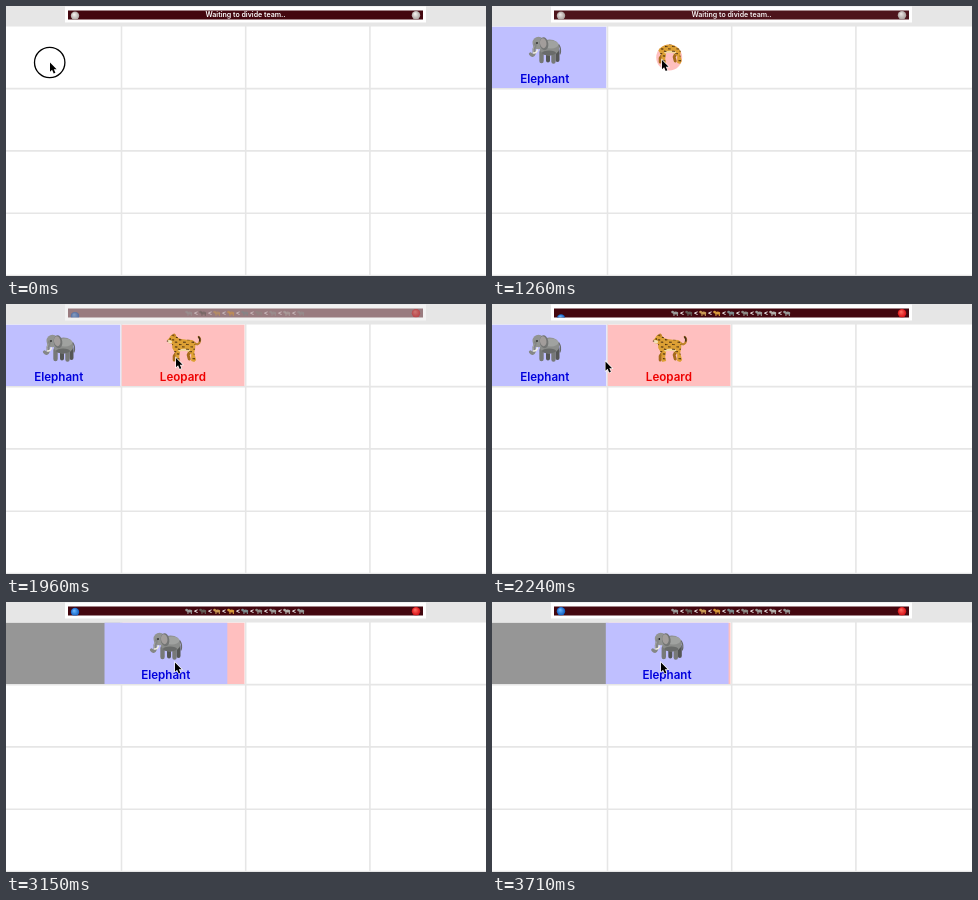
These frames come from a looping animation (480x270 px, 3780 ms). An HTML page with a canvas:

```html
<!DOCTYPE html>
<html lang="en">
<head>
<meta charset="utf-8">
<title>Board game</title>
<style>
html, body { margin: 0; width: 100%; height: 100%; overflow: hidden; background: #fff; }
canvas { display: block; width: 480px; height: 270px; }
</style>
</head>
<body>
<canvas id="stage" width="480" height="270"></canvas>
<script>
const ctx = document.getElementById('stage').getContext('2d');
const LOOP = 3780, STEP = 70;
const FONT = 'Inter, "Liberation Sans", sans-serif';
const CELL_W = 124.2, CELL_H = 62.3;
const GRID = '#e6e6e6';

const clamp = v => Math.max(0, Math.min(1, v));
const ramp = (t, a, b) => clamp((t - a) / (b - a));
const smooth = v => v * v * (3 - 2 * v);
const easeOut = v => 1 - (1 - v) ** 3;
const lerp = (a, b, v) => a + (b - a) * v;

function ellipse(x, y, rx, ry, color, tilt = 0) {
  ctx.fillStyle = color;
  ctx.beginPath();
  ctx.ellipse(x, y, rx, ry, tilt, 0, 7);
  ctx.fill();
}

function box(x, y, w, h, color, r = 0) {
  ctx.fillStyle = color;
  ctx.beginPath();
  ctx.roundRect(x, y, w, h, r);
  ctx.fill();
}

function line(path, color, width) {
  ctx.strokeStyle = color;
  ctx.lineWidth = width;
  ctx.lineCap = ctx.lineJoin = 'round';
  ctx.stroke(new Path2D(path));
}

function label(text, x, y, size, color, weight = 600) {
  ctx.font = `${weight} ${size}px ${FONT}`;
  ctx.textAlign = 'center';
  ctx.fillStyle = color;
  ctx.fillText(text, x, y);
}

function layer(draw, alpha = 1) {
  ctx.save();
  ctx.globalAlpha *= alpha;
  draw();
  ctx.restore();
}

// Animals are drawn around the card centre, facing left.
function elephant() {
  line('M3 3V11.5 M12.5 1V11', '#545655', 4);
  line('M-3.5 3V12 M8.5 2V12.5', '#777978', 4.4);
  ellipse(4.5, -1.5, 10, 8, '#8b8d8b');
  ellipse(6, -4.5, 7.5, 4, '#a0a2a0');
  ellipse(4, 4, 7, 2.4, '#696b6a');
  line('M14 -4Q16.5 0 15 5', '#686a69', 1.2);
  ellipse(-6.5, -6, 6, 6.3, '#929492');
  line('M-9.5 -5Q-11.5 0 -10.8 4.5Q-12 8 -14.5 5', '#858785', 3.2);
  line('M-11 -3Q-12.4 0 -11.7 4', '#a6a8a6', 1);
  line('M-7.5 1Q-9 4.5 -11.5 4', '#f0eee0', 1.5);
  ellipse(-1, -5.2, 4.3, 6.5, '#737574', -0.15);
  ellipse(-1.8, -5.8, 3.2, 5, '#a29d9b', -0.15);
  ellipse(-8, -6, 0.8, 0.9, '#222');
}

const CAT_BODY = new Path2D('M-14-9Q-12-14-8-12Q-6-9-2-8Q4-7 9-7Q13-5 12 1L11 6L13 13L11 15L8 14L8 7L4 4L-3 4L-4 10L-3 14L-7 15L-8 6L-11 1L-11-3L-15-4L-16-7Z');
function leopard() {
  line('M-5 3L-9 9L-9 13 M8 2L5 8L6 12', '#a66a1c', 3);
  line('M10 -5Q14 -1 16 -4Q18 -8 15.5 -10', '#bd8127', 2.2);
  line('M16.6 -6Q17 -9 15.5 -10', '#49301a', 1.6);
  ctx.fillStyle = '#dda034';
  ctx.fill(CAT_BODY);
  ellipse(-9, -11.7, 1.6, 1.7, '#c38328');
  layer(() => {
    ctx.clip(CAT_BODY);
    ellipse(1, 3.5, 6, 1.8, '#f1d6a0');
    ellipse(-14.2, -5, 3, 1.9, '#f3dfb8');
    for (let i = 0; i < 65; i++) {
      const x = -11 + (i * 7.31) % 24, y = -12 + (i * 4.73) % 26;
      ellipse(x, y, 0.75, 0.65, '#4e3212');
    }
  });
  ellipse(-13, -8, 0.8, 0.8, '#231a0a');
  ellipse(-15.7, -6, 0.8, 0.6, '#3a2516');
}

function card(x, name, animal, fill, ink) {
  box(x - CELL_W / 2 + 0.6, 20.8, CELL_W - 1.4, 61.2, fill);
  layer(() => { ctx.translate(x, 43); animal(); });
  label(name, x - 0.3, 77, 11.6, ink);
}

const elephantCard = x => card(x, 'Elephant', elephant, '#bfbfff', '#0000dd');
const leopardCard = x => card(x, 'Leopard', leopard, '#ffbfbf', '#ee0000');

function reveal(x, r, draw) {
  if (r <= 0) return;
  layer(() => {
    ctx.beginPath();
    ctx.arc(x, 51.5, r, 0, 7);
    ctx.clip();
    draw(x);
  });
}

function board() {
  box(0, 0, 480, 270, '#fff');
  box(0, 0, 480, 20.5, GRID);
  for (let i = 1; i < 4; i++) box(-9.3 + CELL_W * i - 0.2, 20, 1.6, 250, GRID);
  for (let i = 1; i < 5; i++) box(0, 19.5 + CELL_H * i, 480, 1.6, GRID);
}

function ball(x, y, light, dark) {
  const g = ctx.createRadialGradient(x - 1, y - 1.5, 0.3, x, y, 4.4);
  g.addColorStop(0, light);
  g.addColorStop(1, dark);
  ellipse(x, y, 4.2, 4.2, g);
}

const bounce = (t, top) => 9.2 + 3.5 * (1 - Math.cos((t - top) / 630 * 2 * Math.PI));

const CHAIN = ['#9a9a98', '#635d56', '#c99a55', '#d89a3a', '#7b8a8c', '#8d8984', '#9b9a97', '#b3afaa', '#969896'];
function chain() {
  CHAIN.forEach((color, i) => {
    const x = 183 + i * 14;
    ellipse(x + 0.6, 9, 2.8, 1.5, color);
    ellipse(x - 2.4, 8.1, 1.4, 1.4, color);
    box(x - 1.6, 9.5, 1.1, 2.4, color);
    box(x + 1.8, 9.5, 1.1, 2.4, color);
    if (i < CHAIN.length - 1) label('<', x + 7, 11.4, 6.6, '#fff', 700);
  });
}

function banner(t, divided) {
  box(59, 0.5, 361, 16, '#fff');
  box(62, 4.4, 355, 9, '#43070f');
  layer(() => {
    ctx.beginPath();
    ctx.rect(62, 3, 355, 10.4);
    ctx.clip();
    if (divided) {
      ball(69, bounce(t, 3710), '#6ab8ff', '#0a58bd');
      ball(410, 9.2, '#ff6b60', '#d50b12');
      chain();
    } else {
      ball(69, 9.8, '#f4f1ef', '#aaa29f');
      ball(410, bounce(t, 0), '#f4f1ef', '#aaa29f');
      label('Waiting to divide team..', 239.5, 11.4, 7.05, '#fff');
    }
  });
}

// Pointer stops: start time, end time, x, y
const MOVES = [[700, 980, 170, 54], [2100, 2380, 57, 61], [2590, 2800, 169, 60.5]];
const CLICKS = [[0, 140], [1050, 1190], [2380, 2520], [2870, 3010]];

function pointer(t) {
  let x = 44, y = 56.5;
  for (const [from, to, px, py] of MOVES) {
    const v = smooth(ramp(t, from, to));
    x = lerp(x, px, v);
    y = lerp(y, py, v);
  }
  if (CLICKS.some(([on, off]) => t >= on && t < off)) {
    ctx.strokeStyle = '#000';
    ctx.lineWidth = 1.3;
    ctx.beginPath();
    ctx.arc(x - 0.3, y, 15.2, 0, 7);
    ctx.stroke();
  }
  layer(() => {
    ctx.translate(x, y);
    const arrow = new Path2D('M0 0V9.2L2.1 7.3L3.7 11L5.4 10.2L3.8 6.7H6.6Z');
    ctx.strokeStyle = '#fff';
    ctx.lineWidth = 1.2;
    ctx.stroke(arrow);
    ctx.fillStyle = '#000';
    ctx.fill(arrow);
  });
}

function draw(t) {
  board();

  if (t < 1890) layer(() => banner(t, false), 1 - smooth(ramp(t, 1190, 1680)));
  layer(() => banner(t, true), smooth(ramp(t, 1820, 2100)));

  const shade = 0.5 * ramp(t, 2450, 2590) * (1 - ramp(t, 2940, 3150));
  const move = easeOut(ramp(t, 3010, 3290));
  const home = 53, next = home + CELL_W;

  reveal(next, (t - 1201) * 0.22, leopardCard);
  if (shade) {
    const dark = `rgba(4,0,0,${shade})`;
    box(115.2, 20, 124.2, 62.3, dark, 2);
    box(-9, 82.8, 124, 62.2, dark, 2);
  }
  if (move) box(0, 20.8, 114.5, 61.2, '#969696');
  reveal(home + 122.3 * move, (t - 211) * 0.22, elephantCard);
  pointer(t);
}

// The picture advances in even steps, with two held beats.
function stepTime(ms) {
  const t = Math.floor(ms % LOOP / STEP) * STEP;
  return t === 1470 || t === 2940 ? t - STEP : t;
}

const start = performance.now();
function tick() {
  draw(stepTime(performance.now() - start));
  requestAnimationFrame(tick);
}
tick();
</script>
</body>
</html>
```
